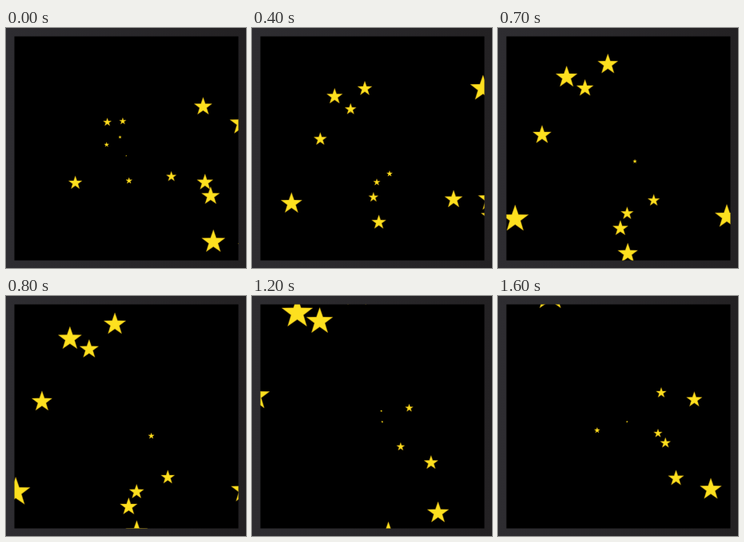
Recreate the animation shown at these times as an HTML page with a canvas. Size 300 by 300 pixels, loop 1700 ms.

```html
<!DOCTYPE html>
<html lang="en">
<head>
<meta charset="utf-8">
<title>Star flight</title>
<style>
  html, body { margin: 0; width: 100%; height: 100%; overflow: hidden; background: #000; }
  canvas { display: block; width: 300px; height: 300px; }
</style>
</head>
<body>
<canvas id="stage" width="300" height="300"></canvas>
<script>
const ctx = document.getElementById('stage').getContext('2d');
const LOOP = 1700, STEP = 100;
const LIFE = 20;     // steps until a star is born again
const SPEED = 11.7;  // pixels per step
const GROWTH = 1.25; // radius gained per step
const DRIFT = { x: 1.2, y: 1.3 }; // growing stars also slide down and right
const CENTER = 150;
const WINDOW = [10.5, 10.5, 280, 280];

// Every star follows one rule; only its heading (degrees) and birth step differ.
const stars = [
  [87, 0.7], [57, 1.1], [37, 5], [47, 8.1],
  [-19.5, 8.2], [-36.6, 10.9], [27, 10.9], [20, 11.9],
  [154, 13.2], [30, 15], [233, 16], [258, 16.7],
  [90, 16.85], [195, 17.6], [239, 18.45], [94, 19.25]
].map(([degrees, birth]) => ({ heading: degrees * Math.PI / 180, birth }));

function drawFrame() {
  const shade = ctx.createLinearGradient(0, 0, 300, 0);
  shade.addColorStop(0, '#2e2d31');
  shade.addColorStop(1, '#232123');
  ctx.fillStyle = shade;
  ctx.fillRect(0, 0, 300, 300);
  ctx.fillStyle = '#000';
  ctx.fillRect(...WINDOW);
}

function drawStar(x, y, radius) {
  ctx.beginPath();
  for (let i = 0; i < 10; i++) {
    const r = i % 2 ? radius * 0.4 : radius;
    const angle = i * Math.PI / 5 - Math.PI / 2;
    ctx.lineTo(x + r * Math.cos(angle), y + r * Math.sin(angle));
  }
  ctx.closePath();
  ctx.fill();
  ctx.stroke();
}

function render(now) {
  const step = Math.floor((now % LOOP) / STEP);
  drawFrame();
  ctx.save();
  ctx.beginPath();
  ctx.rect(...WINDOW);
  ctx.clip();
  ctx.fillStyle = '#fde01f';
  ctx.strokeStyle = 'rgba(225, 180, 20, 0.4)';
  ctx.lineJoin = 'round';
  for (const { heading, birth } of stars) {
    const age = (step - birth + LIFE) % LIFE;
    const x = CENTER + age * (DRIFT.x + SPEED * Math.cos(heading));
    const y = CENTER + age * (DRIFT.y + SPEED * Math.sin(heading));
    const radius = GROWTH * age;
    ctx.lineWidth = Math.min(1.2, radius / 4);
    if (radius > 0.6) drawStar(x, y, radius);
  }
  ctx.restore();
}

const start = performance.now();
function tick() {
  render(performance.now() - start);
  requestAnimationFrame(tick);
}
tick();
</script>
</body>
</html>
```
